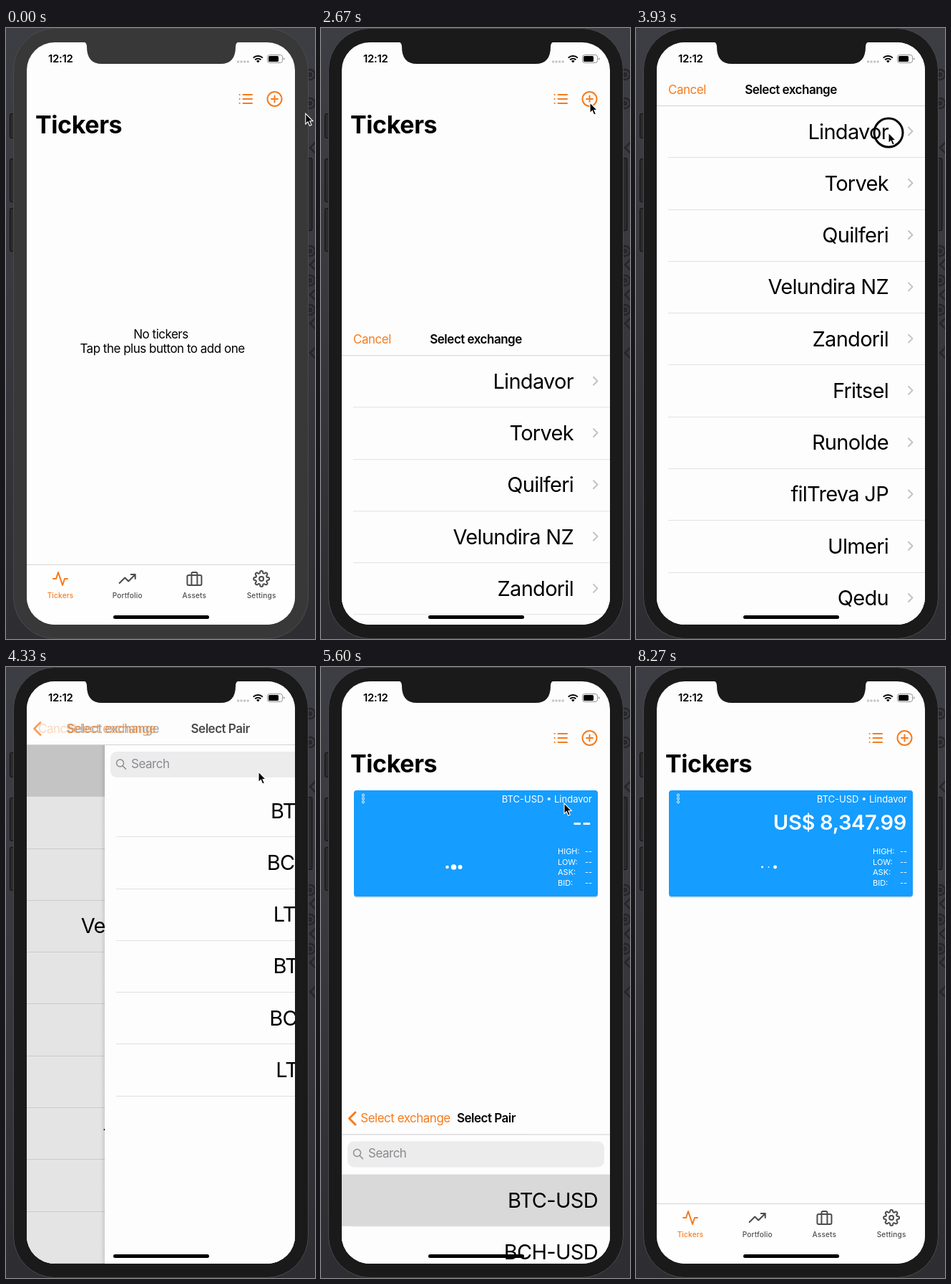
Write an HTML page that moves like this. It is 432 px wide and 852 px high and loops after 8340 ms.

```html
<!DOCTYPE html>
<html lang="en">
<head>
<meta charset="utf-8">
<title>Tickers</title>
<style>
html, body { margin: 0; width: 100%; height: 100%; overflow: hidden; background: #38383f; }
svg { display: block; width: 432px; height: 852px; font: 17px Inter, Roboto, sans-serif; letter-spacing: -.5px; }
.line { fill: none; stroke-linecap: round; stroke-linejoin: round; stroke-width: 2; }
.orange { fill: #f57c1f; }
.line.orange { fill: none; stroke: #f57c1f; }
.mid { text-anchor: middle; }
.end { text-anchor: end; }
.bold { font-weight: 600; }
.h1 { font-size: 34px; font-weight: 700; letter-spacing: -.4px; }
.big { font-size: 29px; letter-spacing: -.7px; }
.tab { font-size: 10px; font-weight: 500; letter-spacing: .2px; }
.card { fill: #fff; letter-spacing: 0; }
.sep { stroke: #e1e1e1; }
.bar { stroke: #d3d3d5; }
</style>
</head>
<body>
<svg id="stage" viewBox="0 0 432 852"></svg>
<script>
const LOOP = 8340, HEIGHT = 812, WIDTH = 375, ROW = 72.28;
const exchanges = ['Lindavor', 'Torvek', 'Quilferi', 'Velundira NZ', 'Zandoril',
  'Fritsel', 'Runolde', 'filTreva JP', 'Ulmeri', 'Qedu'];
const pairs = ['BTC-USD', 'BCH-USD', 'LTC-USD', 'BTC-EUR', 'BCH-EUR', 'LTC-EUR'];

const text = (x, y, cls, s, extra = '') => `<text x="${x}" y="${y}" class="${cls}" ${extra}>${s}</text>`;
const line = (d, cls = '', extra = '') => `<path d="${d}" class="line ${cls}" ${extra}/>`;
const rect = (x, y, w, h, r, fill, extra = '') =>
  `<rect x="${x}" y="${y}" width="${w}" height="${h}" rx="${r}" fill="${fill}" ${extra}/>`;
const ring = (x, y, r, extra) => `<circle cx="${x}" cy="${y}" r="${r}" fill="none" ${extra}/>`;

const rows = (names, top, right, arrow) => names.map((name, i) => {
  const y = top + i * ROW, mid = y + 36;
  return text(right, mid + 10.5, 'big end', name) +
    `<path class="sep" d="M45 ${Math.round(y + ROW) + .5}H404"/>` +
    (arrow ? line(`M381 ${mid - 5.5}l5.5 5.5-5.5 5.5`, '', 'stroke="#c3c3c6"') : '');
}).join('');

const gear = 'M19.4 15a1.65 1.65 0 0 0 .33 1.82l.06.06a2 2 0 1 1-2.83 2.83l-.06-.06a1.65 1.65 0 0 0-2.82 1.17V21a2 2 0 0 1-4 0v-.09A1.65 1.65 0 0 0 7.1 19.7l-.06.06a2 2 0 1 1-2.83-2.83l.06-.06A1.65 1.65 0 0 0 3.1 14H3a2 2 0 0 1 0-4h.09A1.65 1.65 0 0 0 4.3 7.1l-.06-.06a2 2 0 1 1 2.83-2.83l.06.06A1.65 1.65 0 0 0 10 3.1V3a2 2 0 0 1 4 0v.09a1.65 1.65 0 0 0 2.82 1.18l.06-.06a2 2 0 1 1 2.83 2.83l-.06.06A1.65 1.65 0 0 0 20.9 10H21a2 2 0 0 1 0 4h-.09a1.65 1.65 0 0 0-1.51 1zM15 12a3 3 0 1 1-6 0 3 3 0 0 1 6 0z';
const tabs = [
  ['Tickers', 'M22 12h-4l-3 9L9 3l-3 9H2'],
  ['Portfolio', 'M23 6l-9.5 9.5-5-5L1 18M17 6h6v6'],
  ['Assets', 'M4 7h16a2 2 0 0 1 2 2v10a2 2 0 0 1-2 2H4a2 2 0 0 1-2-2V9a2 2 0 0 1 2-2zM16 21V5a2 2 0 0 0-2-2h-4a2 2 0 0 0-2 2v16'],
  ['Settings', gear]
].map(([name, d], i) => {
  const x = 76 + i * 93.7;
  return line(d, i ? '' : 'orange', `transform="translate(${x - 12} 756)" stroke="#4c4c4e"`) +
    text(x, 795, 'tab mid' + (i ? '' : ' orange'), name, 'fill="#4c4c4e"');
}).join('');

const card = rect(46, 173.5, 341, 148, 4, '#000', 'opacity=".18"') + rect(46, 172, 341, 148, 4, '#159dff') +
  [178.7, 183.5, 188.3].map(y => ring(59, y, 1.6, 'stroke="#fff"')).join('') +
  text(379, 188.5, 'card end', `BTC-USD • ${exchanges[0]}`, 'font-size="13"') +
  text(378, 227, 'card end bold', '', 'id="price" style="font-size:29px;letter-spacing:-.3px"') +
  ['HIGH:', 'LOW:', 'ASK:', 'BID:'].map((s, i) =>
    text(331, 261 + i * 14.5, 'card', s, 'font-size="11"') +
    text(379, 261 + i * 14.5, 'card end', '--', 'font-size="11"')).join('') +
  [176.5, 185.5, 194.5].map(x => `<circle class="dot" cx="${x}" cy="279" fill="#fff"/>`).join('');

const home = rect(29, 20, 375, 812, 0, '#fdfdfd') +
  line('M331.5 93H344M331.5 99H344M331.5 105H344M326.5 93h.2M326.5 99h.2M326.5 105h.2', 'orange') +
  ring(375.5, 99, 10, 'stroke="#f57c1f" stroke-width="2"') + line('M371 99h9M375.5 94.5v9', 'orange') +
  text(41, 147, 'h1', 'Tickers') +
  `<g id="empty">${text(216.5, 433, 'mid', 'No tickers')}${text(218.5, 453, 'mid', 'Tap the plus button to add one')}</g>
  <g id="card">${card}</g>` +
  rect(29, 748, 375, 84, 0, '#fefefe') + '<path class="bar" d="M29 748.5H404"/>' + tabs;

const modal = rect(29, 20, 375, 812, 0, '#fdfdfd') +
  `<g id="list">${rect(29, 108, 375, 72.3, 0, '#d9d9d9', 'id="pickA"')}${rows(exchanges, 108, 353, true)}</g>` +
  rect(29, 108, 375, 724, 0, '#000', 'id="dim"') +
  `<g id="pairs">${rect(23, 108, 6, 724, 0, 'url(#edge)')}${rect(29, 108, 375, 724, 0, '#fdfdfd')}` +
  rect(37, 118, 359, 36, 9, '#ececed') + ring(50.5, 134, 5, 'stroke="#8a8a8e" stroke-width="1.4"') +
  line('M54.3 138l4.2 4.2', '', 'stroke="#8a8a8e" style="stroke-width:1.5"') +
  text(66, 141, '', 'Search', 'fill="#8a8a8e"') +
  rect(29, 164, 375, 72.3, 0, '#d9d9d9', 'id="pickB"') + rows(pairs, 164, 387) + '</g>' +
  '<path class="bar" d="M29 108.5H404"/>' +
  text(45, 92, 'orange', 'Cancel', 'id="cancel"') +
  line('M48 77.5l-8.5 8.5 8.5 8.5', 'orange', 'id="back" style="stroke-width:3"') +
  text(216.5, 92, 'mid bold', 'Select exchange', 'id="title"') +
  text(118, 92, 'mid orange', 'Select exchange', 'id="backTitle"') +
  text(231, 92, 'mid bold', 'Select Pair', 'id="pairTitle"');

const status = '<path d="M106 19C111 19 113 22 113 26C113 42 120 50 134 50H300C314 50 321 42 321 26C321 22 323 19 328 19Z" class="bezel"/>' +
  text(59, 48, 'bold', '12:12', 'style="font-size:15px;letter-spacing:-.3px"') +
  [324.5, 329, 333.6, 338.2].map(x => `<circle cx="${x}" cy="47" r="1.8" fill="#c6c6c9"/>`).join('') +
  line('M345.7 41.6a9.5 9.5 0 0 1 13.2 0M348.2 44.3a6 6 0 0 1 8.2 0', '', 'stroke="#000" style="stroke-linecap:butt"') +
  '<path d="M352.3 48.5l-2.3-2.5a3.4 3.4 0 0 1 4.6 0z"/>' +
  rect(365.5, 37.5, 21, 11, 3, 'none', 'stroke="#8e8e90"') + rect(367, 39, 14, 8, 1.6, '#000') +
  '<path d="M388 41.2v3.6q1.5-.6 1.5-1.8t-1.5-1.8" fill="#8e8e90"/>' +
  rect(150, 819, 134, 5, 2.5, '#000');

const side = (x, y, w, h) => rect(x, y, w, h, 2, '#2b2b2d', 'stroke="#111113"');
const wall = rect(0, 0, 432, 852, 0, 'url(#wall)') +
  '<g stroke="#26262a" stroke-width="2.5" fill="none">' +
  [65, 105, 311, 352, 393].map(y => ring(425, y, 7, '') + ring(425, y, 2, '')).join('') +
  [167, 330, 372, 412, 453].map(y => `<path d="M433 ${y - 8}l-8 8 8 8"/>`).join('') + '</g>' +
  side(5.5, 119.5, 10, 34) + side(5.5, 182.5, 10, 60) + side(5.5, 251.5, 10, 60) + side(418, 181.5, 10, 101);

stage.innerHTML = `<defs>
  <clipPath id="screen">${rect(29, 20, 375, 812, 39, '#000')}</clipPath>
  <linearGradient id="wall" x2="0" y2="1"><stop stop-color="#3d3d44"/><stop offset=".4" stop-color="#39393f"/><stop offset="1" stop-color="#2d2d32"/></linearGradient>
  <linearGradient id="edge"><stop stop-opacity="0"/><stop offset="1" stop-opacity=".1"/></linearGradient>
  </defs>${wall}` +
  rect(10.5, .5, 412, 851, 58, '', 'class="bezel" stroke="#4b4b4e"') +
  `<g clip-path="url(#screen)">${home}<g id="modal">${modal}</g>${status}</g>
  <g id="pointer">${ring(0, 0, 20, 'id="tap" stroke="#000" stroke-width="3"')}
  <path d="M0 0V14.6L3.3 11.5L5.6 17L8.3 15.9L6 10.5H10.3Z" stroke="#fff" stroke-width="1.1"/></g>`;

const el = id => document.getElementById(id);
const bezels = document.querySelectorAll('.bezel'), dots = document.querySelectorAll('.dot');
const clamp = v => Math.max(0, Math.min(1, v));
// critically damped spring, 0 to 1
const spring = (t, start) => {
  const x = Math.max(0, t - start) * .01826;
  return 1 - (1 + x) * Math.exp(-x);
};
const path = [[0, 419, 119], [70, 405, 138], [130, 360, 151], [200, 325, 149], [270, 350, 122], [330, 376, 104],
  [3070, 376, 104], [3470, 353, 146], [4800, 353, 146], [4930, 361, 158], [5130, 340, 190],
  [6330, 340, 190], [6800, 388, 150], [LOOP, 388, 150]];
const taps = [[325, 395], [2390, 2560], [3930, 4125], [5260, 5465]];

function pointerAt(t) {
  const i = path.findIndex(p => p[0] > t), [t0, x0, y0] = path[i - 1], [t1, x1, y1] = path[i];
  const k = (t - t0) / (t1 - t0);
  return [x0 + (x1 - x0) * k, y0 + (y1 - y0) * k];
}
const show = (id, on) => el(id).style.display = on ? '' : 'none';
const shift = (id, x, y = 0) => el(id).setAttribute('transform', `translate(${x} ${y})`);
const fade = (id, v) => el(id).style.opacity = v;

function draw(t) {
  const level = Math.round(56 - 30 * clamp((t - 900) / 200));
  bezels.forEach(b => b.setAttribute('fill', `rgb(${level},${level},${level})`));

  shift('modal', 0, HEIGHT * (1 - spring(t, 2566) + spring(t, 5475)));
  show('modal', t > 2566 && t < 6300);
  const p = spring(t, 4195);
  shift('list', -WIDTH * .3 * p);
  shift('pairs', WIDTH * (1 - p));
  show('pairs', p > 0);
  fade('dim', p * .14 < .1 ? p * .14 : .1);
  show('pickA', t > 4125);
  show('pickB', t > 5440);
  fade('cancel', 1 - p);
  fade('back', p);
  shift('title', -94 * p);
  fade('title', 1 - p);
  shift('backTitle', 98.5 * (1 - p));
  fade('backTitle', p);
  shift('pairTitle', 236 * (1 - p));
  fade('pairTitle', p);

  show('empty', t < 5475);
  show('card', t >= 5475);
  el('price').textContent = t < 6500 ? '--' : 'US$ 8,347.99';
  dots.forEach((dot, i) => {
    const a = (57 - 77 * i) * Math.PI / 180 + (t - 8270) / 1109 * 2 * Math.PI;
    dot.setAttribute('r', .8 + 1.5 * (1 - Math.cos(a)));
  });

  shift('pointer', ...pointerAt(t));
  show('pointer', t < 6930);
  show('tap', taps.some(([a, b]) => t >= a && t < b));
}

const begin = performance.now();
function tick() {
  draw((performance.now() - begin) % LOOP);
  requestAnimationFrame(tick);
}
tick();
</script>
</body>
</html>
```
